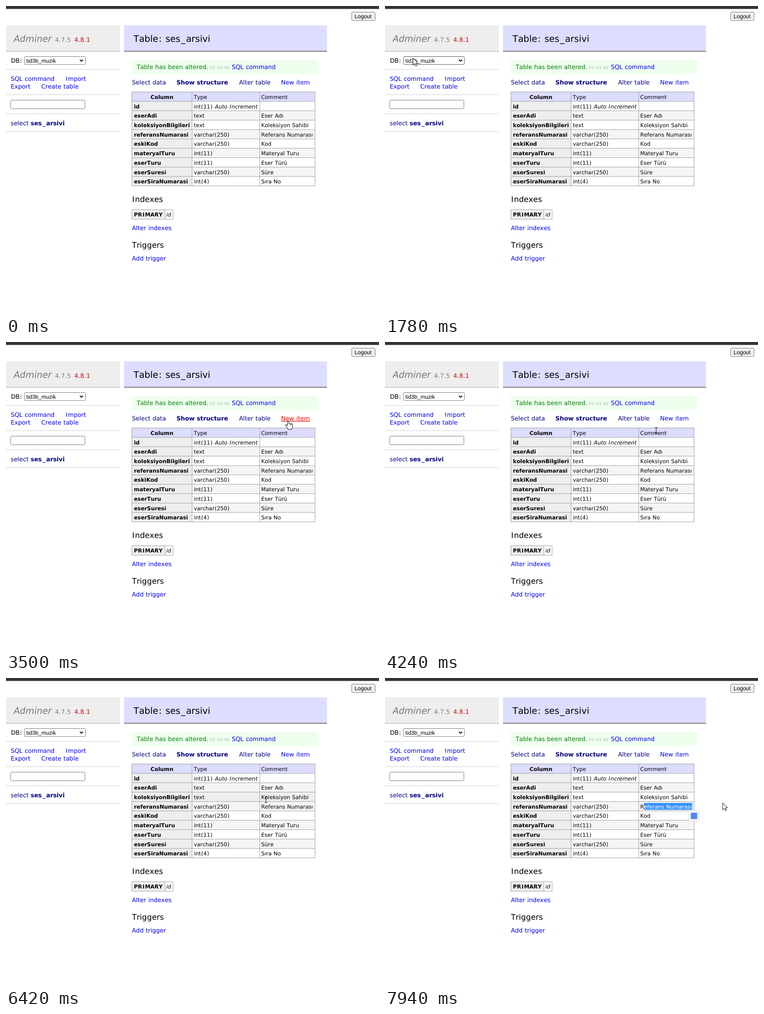
An HTML page that plays this animation: 825x679 px, repeating every 8 s.

```html
<!DOCTYPE html>
<html lang="en">
<head>
<meta charset="utf-8">
<title>Table: ses_arsivi</title>
<style>
html, body { margin: 0; height: 100%; overflow: hidden; background: #fff; }
svg { display: block; width: 825px; height: 679px; }
text { font-family: "DejaVu Sans", Verdana, sans-serif; font-kerning: none; text-rendering: geometricPrecision; word-spacing: .034em; white-space: pre; }
.b { font-weight: bold; word-spacing: 0; }
.i { font-style: italic; }
.ui { font-family: "Liberation Sans", Arial, sans-serif; }
.link.on { fill: #f00; text-decoration: underline; }
.box { fill: #fff; stroke: #767676; }
.box.on { stroke: #4f4f4f; }
</style>
</head>
<body>
<svg id="stage" viewBox="0 0 825 679"></svg>
<script>
const LOOP = 8000, LAG = 25;
const BODY = 13.25, CELL = 11.92, HEAD = 19.87, SUB = 17.2;
const BLUE = '#00f', NAVY = '#000080';
const stage = document.getElementById('stage');

function el(tag, attrs, parent = stage) {
  const node = document.createElementNS('http://www.w3.org/2000/svg', tag);
  for (const key in attrs) node.setAttribute(key, attrs[key]);
  return parent.appendChild(node);
}
const rect = (x, y, width, height, fill, more, parent) =>
  el('rect', { x, y, width, height, fill, ...more }, parent);

// Thin rules, placed by their middle
const THIN = .95;
const rule = (x, y, w, fill) => rect(x, y - THIN / 2, w, THIN, fill);
const upright = (x, y, h, fill) => rect(x - THIN / 2, y, THIN, h, fill);

// Extra advance in em for glyphs that are wider in the page font
const PAD = { _: .136, ':': .117, I: .126, '(': .064, ')': .064, '.': .046 };
const BOLD_PAD = { _: .211, I: .174 };

function text(x, y, str, size = BODY, fill = '#000', cls = '', parent = stage) {
  const pads = cls.includes('ui') ? {} : cls.includes('b') ? BOLD_PAD : PAD;
  const node = el('text', { x, y, 'font-size': size, fill, class: cls }, parent);
  for (const part of str.split(/([_:I().])/)) {
    if (!part) continue;
    const span = el('tspan', {}, node);
    span.textContent = part;
    const half = pads[part] / 2;
    if (half) {
      span.setAttribute('dx', half + 'em');
      span.style.letterSpacing = half + 'em';
    }
  }
  return node;
}

const links = [];
function link(x, y, str, fill = BLUE, cls = '') {
  const node = text(x, y, str, BODY, fill, 'link ' + cls);
  links.push({ node, x, y: y - 12, w: node.getComputedTextLength(), h: 16 });
}

// Top bar and headings
rect(0, 0, 825, 6.5, '#333');
rect(0, 42.8, 252, 57, '#eee');
rule(0, 99.8, 252, '#999');
rect(261, 42.8, 449, 57, '#ddf');
rule(261, 99.8, 449, '#000');
text(17, 79, 'Adminer', HEAD, '#777', 'i');
text(108.5, 79, '4.7.5', 13.3, '#777');
text(151, 79, '4.8.1', 13.3, '#d00000');
text(282, 79, 'Table: ses_arsivi', HEAD);
rect(764.5, 13.5, 52, 18.5, '#efefef', { rx: 2.5, stroke: '#767676' });
text(771, 27, 'Logout', 12.27, '#000', 'ui');

// Menu
text(11, 125, 'DB:');
const fields = [
  { x: 41, y: 111.5, w: 134.5, h: 17.5 },
  { x: 10.5, y: 207.5, w: 164, h: 19 }
];
for (const f of fields)
  f.node = rect(f.x, f.y, f.w, f.h, '#fff', { rx: 2, class: 'box' });
text(45, 124.5, 'tid3b_muzik', 12.27, '#000', 'ui');
el('path', { d: 'M163.5 118.3l3.5 3.6 3.5-3.6', fill: 'none', stroke: '#000', 'stroke-width': 1.8 });
for (const y of [139.8, 195.5, 237.5, 276.5]) rule(0, y, 252, '#ccc');
link(10.5, 165, 'SQL command');
link(131.5, 165, 'Import');
link(10.5, 181.5, 'Export');
link(78, 181.5, 'Create table');
link(10.5, 262.5, 'select', NAVY);
link(54.5, 262.5, 'ses_arsivi', NAVY, 'b');

// Message and tabs
rect(278, 119, 413, 31, '#efe');
text(289, 139.3, 'Table has been altered.', BODY, '#008000');
text(450.5, 139.3, '02:44:45', 9.27, '#b8b8b8');
link(499.5, 139.3, 'SQL command');
link(278.5, 173, 'Select data', NAVY);
link(377, 173, 'Show structure', NAVY, 'b');
link(515.5, 173, 'Alter table', NAVY);
link(608.5, 173, 'New item');

// Structure table
const TOP = 189.5, PITCH = 20.7;
const base = i => 204.9 + PITCH * i;
const columns = [
  ['id', 'int(11)', ''],
  ['eserAdi', 'text', 'Eser Adı'],
  ['koleksiyonBilgileri', 'text', 'Koleksiyon Sahibi'],
  ['referansNumarasi', 'varchar(250)', 'Referans Numarası'],
  ['eskiKod', 'varchar(250)', 'Kod'],
  ['materyalTuru', 'int(11)', 'Materyal Turu'],
  ['eserTuru', 'int(11)', 'Eser Türü'],
  ['eserSuresi', 'varchar(250)', 'Süre'],
  ['eserSiraNumarasi', 'int(4)', 'Sıra No']
];
rect(278, TOP, 405, PITCH, '#ddf');
rect(278, TOP + PITCH, 133, PITCH * 9, '#eee');
text(345, base(0), 'Column', CELL, '#000', 'b').setAttribute('text-anchor', 'middle');
text(415.5, base(0), 'Type', CELL);
text(564.5, base(0), 'Comment', CELL);
const rows = columns.map(([name, type, note], n) => {
  const y = TOP + PITCH * (n + 1), fill = n % 2 ? '#f5f5f5' : '#fff';
  const node = rect(411, y, 272, PITCH, fill);
  text(283, base(n + 1), name, CELL, '#000', 'b');
  text(415.5, base(n + 1), type, CELL);
  text(564.5, base(n + 1), note, CELL);
  return { node, fill, x: 278, y, w: 405, h: PITCH };
});
text(462, base(1), 'Auto Increment', CELL, '#000', 'i');
for (let i = 0; i <= 10; i++) rule(278, TOP + PITCH * i, 406, '#999');
for (const x of [278.5, 411.5, 561.2, 683.5]) upright(x, TOP, PITCH * 10, '#999');

// Indexes and triggers
text(278, 432, 'Indexes', SUB);
rect(278.5, 449, 73, 21, '#eee');
for (const y of [449, 470]) rule(278, y, 92, '#999');
for (const x of [278.5, 351.5, 369.5]) upright(x, 449, 21, '#999');
text(283, 464.3, 'PRIMARY', CELL, '#000', 'b');
text(354.5, 464.3, 'id', CELL, '#000', 'i');
link(278.5, 494, 'Alter indexes');
text(278.5, 533, 'Triggers', SUB);
link(278.5, 561, 'Add trigger');

// Text selections with their popup buttons
function selection(id, x, w, line, str, px, py) {
  const y = base(line) - 12.2, h = 15;
  const clip = el('clipPath', { id });
  const shape = rect(x, y, w, h, '#000', {}, clip);
  const group = el('g', {});
  const back = rect(x, y, w, h, '#3390ff', {}, group);
  const top = text(564.5, base(line), str, CELL, '#fff', '', group);
  top.setAttribute('clip-path', `url(#${id})`);
  const popup = el('g', { transform: `translate(${px} ${py})` });
  rect(.5, .5, 23, 23, '#f5f5f5', { rx: 2, stroke: '#dcdcdc' }, popup);
  rect(5, 5, 14, 14, '#4a87ee', { rx: 1 }, popup);
  return {
    show(picked, width, button) {
      group.style.display = picked ? '' : 'none';
      popup.style.display = button ? '' : 'none';
      for (const r of [shape, back]) r.setAttribute('width', width);
    }
  };
}
const first = selection('pick-a', 564.5, 59, 0, 'Comment', 568, 166);
const second = selection('pick-b', 573, 106.5, 4, 'Referans Numarası', 671.5, 292);

// Pointer shapes, hot spot at the origin
const shapes = {
  arrow: el('path', { d: 'M0 0V15.5L3.6 12.2L6 17.5L8.2 16.6L6 11.2H10.6Z', fill: '#fff', stroke: '#000' }),
  hand: el('path', {
    d: 'M-1.5 13V1.5a1.5 1.5 0 0 1 3 0V8c0-1.5 3-1.5 3 .4c0-1.4 2.7-1.3 2.7.5c0-1.2 2.6-1 2.6.8V14C9.8 17 8 18 8 20.5H-.5C-.5 18-3 16-5.8 12C-7 10-4.5 9-3 10.8L-1.5 13M4.5 8.4V11.5M7.2 9V11.8',
    fill: '#fff', stroke: '#000', 'stroke-linejoin': 'round'
  }),
  beam: el('path', { d: 'M-2.7-6.5H-.8L0-6L.8-6.5H2.7M0-6V6M-2.7 6.5H-.8L0 6L.8 6.5H2.7', fill: 'none', stroke: '#000' })
};

// Pointer path: time, x, y
const path = [
  [370, 448, 690], [700, 428, 570], [900, 406, 432], [1040, 388, 332], [1150, 370, 256],
  [1300, 240, 240], [1420, 130, 208], [1560, 82, 152], [1700, 63, 120], [1780, 62, 115],
  [2020, 62, 115], [2300, 85, 121], [2740, 112, 122], [3000, 112, 122],
  [3150, 300, 142], [3300, 520, 164], [3420, 618, 174], [3500, 624, 172], [3790, 625, 174],
  [4100, 612, 188], [4400, 586, 203], [4590, 584, 199], [5070, 584, 199],
  [5170, 579, 233], [5220, 579, 233], [5400, 577, 240], [5760, 575, 241],
  [5930, 575, 241], [6080, 578, 214], [6420, 575, 268], [6740, 574, 266],
  [7100, 577, 284], [7520, 573, 283], [7550, 573, 283], [7760, 700, 282], [7860, 747, 275]
];
function pointer(t) {
  const i = path.findIndex(k => k[0] > t);
  if (i < 0) return path[path.length - 1].slice(1);
  if (!i) return [-50, -50];
  const [t0, x0, y0] = path[i - 1], [t1, x1, y1] = path[i];
  const p = (t - t0) / (t1 - t0);
  return [x0 + (x1 - x0) * p, y0 + (y1 - y0) * p];
}

const inside = (b, [x, y]) => x >= b.x && x < b.x + b.w && y >= b.y && y < b.y + b.h;
const words = [
  { x: 564, y: 192, w: 60, h: 16 },
  { x: 564, y: 235, w: 51, h: 14 },
  { x: 564, y: 254, w: 107, h: 18 },
  { x: 564, y: 275, w: 115, h: 16 }
];

function draw(t) {
  const pos = pointer(t), felt = pointer(t - LAG);
  for (const b of [...links, ...fields]) b.node.classList.toggle('on', inside(b, felt));
  for (const r of rows) r.node.setAttribute('fill', inside(r, felt) ? '#eee' : r.fill);

  const dragging = t >= 7550 && t < 7770;
  const kind = links.some(b => inside(b, pos)) ? 'hand'
    : dragging || words.some(b => inside(b, pos)) ? 'beam' : 'arrow';
  for (const name in shapes) {
    shapes[name].style.display = name === kind ? '' : 'none';
    shapes[name].setAttribute('transform', `translate(${pos[0]} ${pos[1]})`);
  }

  first.show(t >= 4690 && t < 5450, 59, t >= 4870 && t < 5450);
  second.show(t >= 7550, Math.max(0, Math.min(106.5, pos[0] - 573)), t >= 7900);
}

let start;
function tick(now) {
  start ??= now;
  draw((now - start) % LOOP);
  requestAnimationFrame(tick);
}
draw(0);
requestAnimationFrame(tick);
</script>
</body>
</html>
```
